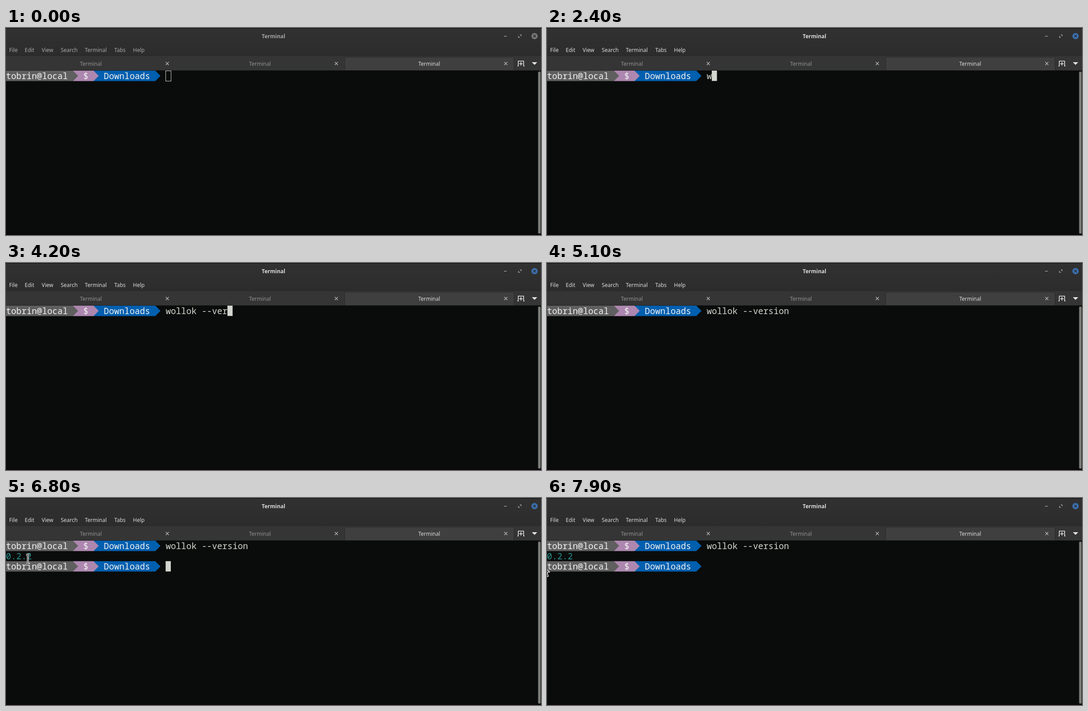
Write an HTML page that moves like this. It is 1201x466 px and loops after 8 s.

```html
<!DOCTYPE html>
<html lang="en">
<head>
<meta charset="utf-8">
<title>Terminal</title>
<style>
  html, body { margin: 0; width: 100%; height: 100%; overflow: hidden; background: #0a0c0b; }
  svg { display: block; width: 1201px; height: 466px; }
  .ui { font: 12px "Noto Sans", "Open Sans", sans-serif; }
  .mono { font: 19.27px "Noto Sans Mono", "DejaVu Sans Mono", monospace; white-space: pre; }
</style>
</head>
<body>
<svg id="stage" viewBox="0 0 1201 466" xmlns="http://www.w3.org/2000/svg">
  <defs>
    <linearGradient id="header" x2="0" y2="1">
      <stop stop-color="#313131"/><stop offset="1" stop-color="#2c2c2c"/>
    </linearGradient>
    <g id="cross"><path d="M-3.4-3.4 3.4 3.4M3.4-3.4-3.4 3.4" stroke="#b4b4b4" stroke-width="1.4"/></g>
    <g id="prompt">
      <path d="M196.5 0H335.2L346.8 11.7 335.2 23.4H196.5z" fill="#005faf"/>
      <path d="M150.3 0H196.5L208.1 11.7 196.5 23.4H150.3z" fill="#ad87af"/>
      <path d="M0 0H150.3L161.8 11.7 150.3 23.4H0z" fill="#5f5f5f"/>
      <g class="mono" fill="#f2f2f2">
        <text y="18.6">tobrin@local</text>
        <text x="173.4" y="18.6">$</text>
        <text x="219.6" y="18.6">Downloads</text>
      </g>
    </g>
  </defs>

  <rect width="1201" height="466" fill="#0a0c0b"/>
  <rect y="463" width="1201" height="3" fill="#0d060c"/>
  <rect width="1201" height="63" fill="url(#header)"/>
  <rect width="1201" height="1" fill="#090909"/>
  <rect y="62" width="1201" height="33" fill="#353535"/>
  <rect y="62" width="1201" height="1" fill="#292929"/>
  <rect x="760" y="65" width="381" height="30" fill="#292929"/>
  <rect x="761" y="66" width="379" height="29" fill="#3f3f3f"/>
  <rect y="95" width="1201" height="1" fill="#222"/>
  <rect x="1194.5" y="98" width="5.5" height="365" rx="2.7" fill="#7b7d78"/>

  <g id="menu" class="ui"></g>
  <g id="tabs" class="ui" text-anchor="middle"></g>
  <text id="title" class="ui" x="600.5" y="23" text-anchor="middle" font-weight="700"
        style="font-weight:700">Terminal</text>

  <g fill="none" stroke="#a8a8a8" stroke-width="1.4">
    <path d="M1118 18.5h6"/>
    <path d="M1153.5 15.5h3v3M1150.5 18v3h3"/>
  </g>
  <circle id="close" cx="1186.5" cy="18.3" r="7"/>
  <path d="M1183.8 15.6l5.4 5.4M1189.2 15.6l-5.4 5.4" stroke="#2d2d2d" stroke-width="1.6"/>
  <path d="M1148 85.5H1150V74.5H1162V85.5H1164M1156 76.5v8M1152 80.5h8"
        fill="none" stroke="#e8e8e8" stroke-width="1.6"/>
  <path d="M1180.5 77h12l-6 6z" fill="#e8e8e8"/>

  <use href="#prompt" y="96"/>
  <text id="command" class="mono" x="358.4" y="114.6" fill="#d3d7cf"></text>
  <text id="output" class="mono" y="137.7" fill="#2a918e">0.2.2</text>
  <use id="nextPrompt" href="#prompt" y="142.2"/>
  <rect id="hollow" x="358.5" y="96.5" width="12" height="23" fill="none" stroke="#d3d7cf"/>
  <rect id="caret" width="11.6" height="23.2" fill="#d3d7cf"/>

  <path id="beam" d="M-4-11H-1.5L0-10 1.5-11H4M0-10V10M-4 11H-1.5L0 10 1.5 11H4"
        fill="none" stroke-linejoin="round"/>
  <path id="arrow" d="M-9-18V-1L-5-5-1 5 2 4-1-5H5z"
        fill="#0a0c0b" stroke="#f4f4f4" stroke-width="1.4" stroke-linejoin="round"/>
</svg>
<script>
const LOOP = 8000, CELL = 11.56, ROW = 23.1, TOP = 96, HOME = 31;
const COMMAND = "wollok --version";
const $ = id => document.getElementById(id);
const SVG = "http://www.w3.org/2000/svg";

function add(parent, tag, attrs, text = "") {
  const el = document.createElementNS(SVG, tag);
  for (const key in attrs) el.setAttribute(key, attrs[key]);
  el.textContent = text;
  parent.append(el);
  return el;
}

const menuItems = { File: 7, Edit: 42, View: 80, Search: 123, Terminal: 177, Tabs: 243, Help: 285 };
for (const [label, x] of Object.entries(menuItems)) add($("menu"), "text", { x, y: 54 }, label);

[[190.5, 362], [570, 741.5], [950, 1122]].forEach(([x, cross], i) => {
  add($("tabs"), "text", { x, y: 84.5, fill: i === 2 ? "#dcdcdc" : "#929292" }, "Terminal");
  add($("tabs"), "use", { href: "#cross", x: cross, y: 80 });
});

// A light outline around a dark core.
const beam = $("beam"), core = beam.cloneNode();
const pointer = add($("stage"), "g", {});
beam.setAttribute("stroke", "#f4f4f4");
beam.setAttribute("stroke-width", 4);
core.removeAttribute("id");
core.setAttribute("stroke", "#111");
core.setAttribute("stroke-width", 1.4);
pointer.append(beam, core);

// [time, characters typed]
const typing = [
  [0, 0], [2400, 1], [2700, 2], [3000, 3], [3100, 4], [3300, 5],
  [3500, 6], [3600, 7], [3700, 8], [3800, 9], [3900, 10],
  [4200, 12], [4300, 13], [4400, 15], [4500, 16]
];
// [time, caret shown]
const blinking = [
  [0, false], [1400, true], [2000, false], [2300, true], [5100, false],
  [5600, true], [6200, false], [6800, true], [7400, false]
];
// [time, x, y, shape]
const mouse = [
  [0], [1100, 355, 448, "beam"], [1200, 377, 428.5, "beam"],
  [1600, 372, 455, "beam"], [1700],
  [6400, 156, 395, "beam"], [6500, 132, 360.5, "beam"],
  [6700, 72, 196, "beam"], [6800, 49, 138.5, "beam"], [6900, 46, 136, "beam"],
  [7000, 45, 138, "beam"], [7100, 48, 140, "beam"], [7200, 54, 141, "beam"],
  [7300, 61, 141, "beam"], [7400, 68, 140, "beam"], [7500, 73, 138, "beam"],
  [7600, 70, 134, "beam"], [7700, 55, 130, "beam"], [7800, 23, 148, "beam"],
  [7900, 1, 172, "arrow"]
];

const latest = (steps, t) => steps.findLast(step => step[0] <= t);
const show = (el, on) => el.setAttribute("visibility", on ? "visible" : "hidden");
const place = (el, x, y) => el.setAttribute("transform", `translate(${x} ${y})`);

function render(t) {
  const focused = t >= 1400;
  $("title").setAttribute("fill", focused ? "#dadada" : "#a4a4a4");
  $("menu").setAttribute("fill", focused ? "#dcdcdc" : "#a9a9a9");
  $("close").setAttribute("fill", focused ? "#3b6fb0" : "#777");
  show($("hollow"), !focused);

  const typed = latest(typing, t)[1];
  $("command").textContent = COMMAND.slice(0, typed);
  show($("output"), t >= 5900);
  show($("nextPrompt"), t >= 6000);

  const [col, row] = t < 5600 ? [HOME + typed, 0]
    : t < 5900 ? [0, 1]
    : t < 6000 ? [0, 2] : [HOME, 2];
  place($("caret"), col * CELL, TOP + row * ROW);
  show($("caret"), latest(blinking, t)[1]);

  const [, x = 0, y = 0, shape] = latest(mouse, t);
  place(pointer, x, y);
  place($("arrow"), x, y);
  show(pointer, shape === "beam");
  show($("arrow"), shape === "arrow");
}

const start = performance.now();
function tick() {
  render((performance.now() - start) % LOOP);
  requestAnimationFrame(tick);
}
tick();
</script>
</body>
</html>
```
